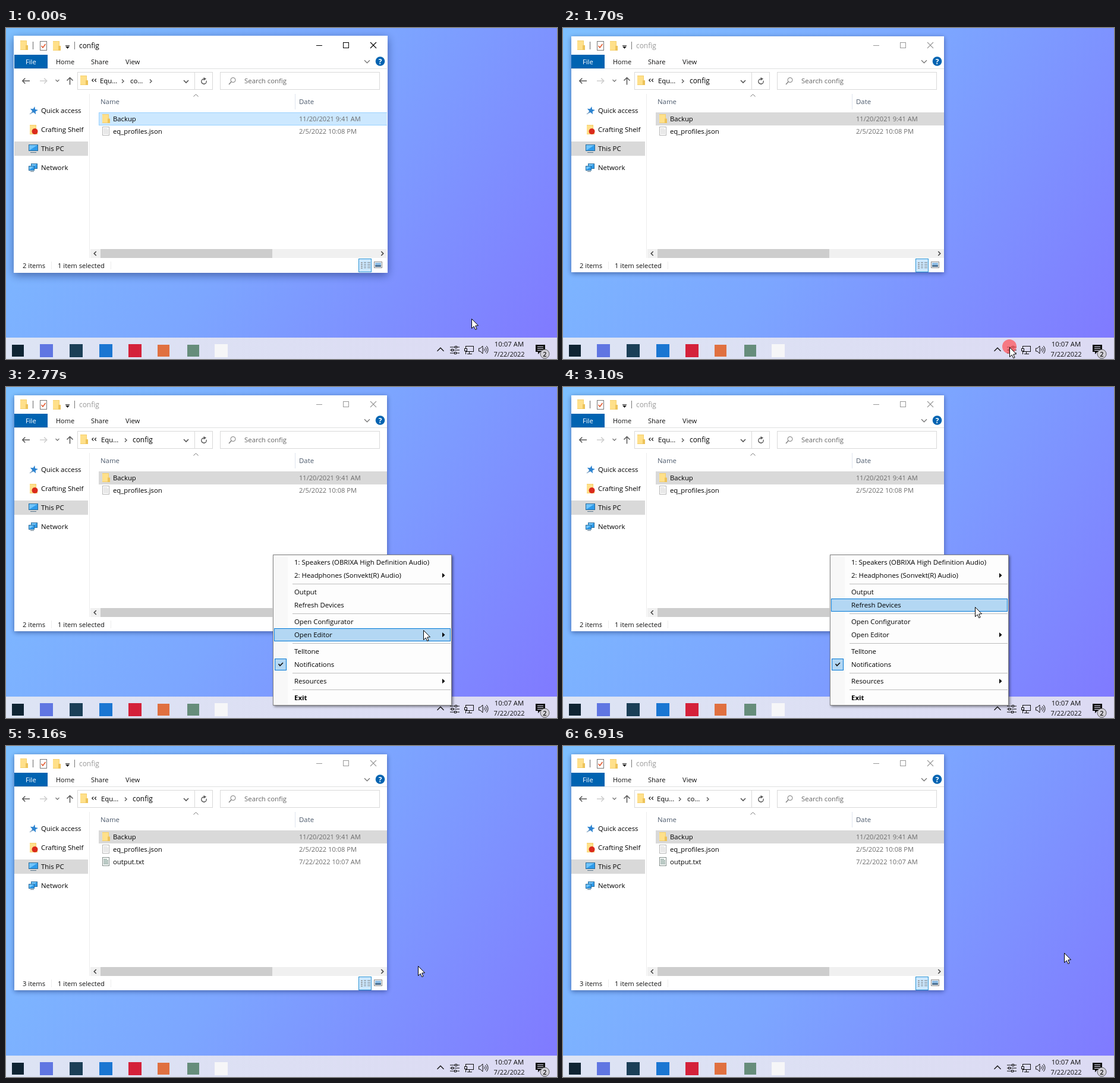
Write an HTML page with a canvas that moves like this. It is 927 px wide and 557 px high and loops after 8 s.

```html
<!DOCTYPE html>
<html lang="en">
<head>
<meta charset="utf-8">
<title>Tray menu demo</title>
<style>
  html, body { margin: 0; width: 100%; height: 100%; overflow: hidden; }
  canvas { display: block; width: 927px; height: 557px; }
</style>
</head>
<body>
<canvas id="stage" width="927" height="557"></canvas>
<script>
const ctx = document.getElementById('stage').getContext('2d');
const LOOP = 8000;
const BLUE = '#0063b1';
const PRESS = 1560, DEACTIVATE = 1630, MENU_OPEN = 1770;
const PICK = 4030, MENU_CLOSE = 4160, FILE_ADDED = 5160, PATH_SHRINK = 5490;

// time, x, y, easing power (above 1 eases in, below 1 eases out)
const POINTER = [
  [0, 783, 489, 1],
  [820, 759, 516, 1.4],
  [1230, 751, 537, 0.7],
  [2040, 751, 537, 1],
  [2230, 743, 504, 1.3],
  [2770, 702, 409, 1],
  [2900, 697, 382, 1],
  [3100, 693, 370, 0.6],
  [5420, 693, 370, 1],
  [5950, 722, 364, 1.9],
  [6290, 766, 358, 1],
  [6910, 843, 348, 0.8]
];

const MENU = [
  { label: '1: Speakers (OBRIXA High Definition Audio)', y: 295 },
  { label: '2: Headphones (Sonvekt(R) Audio)', y: 317, sub: true },
  { label: 'Output', y: 345 },
  { label: 'Refresh Devices', y: 367 },
  { label: 'Open Configurator', y: 395 },
  { label: 'Open Editor', y: 417, sub: true },
  { label: 'Telltone', y: 445 },
  { label: 'Notifications', y: 467, checked: true },
  { label: 'Resources', y: 495, sub: true },
  { label: 'Exit', y: 523, bold: true }
];

function pointerAt(t) {
  for (let i = 1; i < POINTER.length; i++) {
    const [t0, x0, y0] = POINTER[i - 1], [t1, x1, y1, power] = POINTER[i];
    if (t < t1) {
      const k = Math.pow((t - t0) / (t1 - t0), power);
      return [Math.round(x0 + (x1 - x0) * k), Math.round(y0 + (y1 - y0) * k)];
    }
  }
  return POINTER[POINTER.length - 1].slice(1, 3);
}

function box(x, y, w, h, fill, stroke) {
  if (fill) {
    ctx.fillStyle = fill;
    ctx.fillRect(x, y, w, h);
  }
  if (stroke) {
    ctx.strokeStyle = stroke;
    ctx.lineWidth = 1;
    ctx.strokeRect(x + 0.5, y + 0.5, w - 1, h - 1);
  }
}

function shadowBox(x, y, w, h, fill, shadow, blur, dx, dy) {
  ctx.save();
  ctx.shadowColor = shadow;
  ctx.shadowBlur = blur;
  ctx.shadowOffsetX = dx;
  ctx.shadowOffsetY = dy;
  box(x, y, w, h, fill);
  ctx.restore();
}

function trace(points) {
  ctx.beginPath();
  for (let i = 0; i < points.length; i += 2) ctx.lineTo(points[i], points[i + 1]);
}

function line(points, color, width = 1) {
  trace(points);
  ctx.strokeStyle = color;
  ctx.lineWidth = width;
  ctx.stroke();
}

function poly(points, color) {
  trace(points);
  ctx.fillStyle = color;
  ctx.fill();
}

function disc(x, y, r, fill, stroke) {
  ctx.beginPath();
  ctx.arc(x, y, r, 0, Math.PI * 2);
  ctx.fillStyle = fill;
  ctx.fill();
  if (stroke) {
    ctx.strokeStyle = stroke;
    ctx.lineWidth = 1;
    ctx.stroke();
  }
}

function arc(x, y, r, from, to, color, width = 1) {
  ctx.beginPath();
  ctx.arc(x, y, r, from, to);
  ctx.strokeStyle = color;
  ctx.lineWidth = width;
  ctx.stroke();
}

function text(str, x, y, color = '#000', size = 11.4, weight = 400, align = 'left') {
  ctx.font = `${weight} ${size}px "Open Sans", "Noto Sans", sans-serif`;
  ctx.textAlign = align;
  ctx.fillStyle = color;
  ctx.fillText(str, x, y);
}

// dx, dy give the direction the chevron points in
function chevron(x, y, dx, dy, size, color, width = 1.3) {
  const back = size / 2;
  line([
    x - dx * back - dy * size, y - dy * back - dx * size,
    x + dx * back, y + dy * back,
    x - dx * back + dy * size, y - dy * back + dx * size
  ], color, width);
}

function folder(x, y, w = 13, h = 16) {
  box(x, y, w - 2, h, '#f5cf6b');
  box(x, y + 1, w - 3, h - 2, '#ffe08a');
  box(x + w - 4, y + h / 2, 4, h / 2, '#edc35a');
}

function sheet(x, y, lines) {
  box(x, y, 12, 15, '#fff', lines ? '#7f8c88' : '#b5b5b5');
  for (let i = 0; i < 5; i++) {
    box(x + 2, y + 3 + i * 2, i === 0 ? 6 : 8, 1, lines ? '#75948a' : '#d2d2d2');
  }
}

function screenIcon(x, y, w, h) {
  box(x, y, w, h, '#2f9bea', '#276a9b');
  poly([x + 1, y + 1, x + w - 1, y + 1, x + 1, y + h - 1], '#70c4fa');
}

function drawDesktop() {
  const sky = ctx.createLinearGradient(0, 0, 870, 600);
  sky.addColorStop(0, '#7dc0ff');
  sky.addColorStop(0.5, '#7ca6ff');
  sky.addColorStop(1, '#807aff');
  box(0, 0, 927, 557, sky);
}

function drawTaskbar() {
  const bar = ctx.createLinearGradient(0, 0, 927, 0);
  bar.addColorStop(0, '#dde4f4');
  bar.addColorStop(1, '#dcdaf3');
  box(0, 521, 927, 36, bar);

  const apps = [
    [10, 20, '#0f2433'], [57, 22, '#6076e2'], [107, 22, '#1b3f57'], [157, 22, '#1a76d2'],
    [206, 22, '#d4213a'], [255, 20, '#e07040'], [305, 20, '#668d7b'], [351, 22, '#f6f6f8']
  ];
  for (const [x, size, color] of apps) box(x, 543 - size / 2, size, size, color);

  const ink = '#111';
  chevron(731, 541, 0, -1, 5.5, ink);

  for (const [y, knob] of [[537, 757], [542, 751], [547, 756]]) {
    box(747, y - 0.5, 16, 1, ink);
    box(knob - 2, y - 2, 4, 4, '#dddcf3', ink);
  }

  box(773, 535, 14, 10, null, ink);
  box(779, 545, 1, 3, ink);
  box(776, 548, 8, 1, ink);
  box(771, 539, 5, 5, '#dddcf3', ink);
  box(773, 544, 1, 5, ink);

  line([795.5, 539, 798, 539, 802, 535, 802, 548, 798, 544, 795.5, 544, 795.5, 539], ink);
  for (const r of [3, 6, 9]) arc(802, 541.5, r, -0.8, 0.8, ink);

  text('10:07 AM', 846.5, 536, ink, 11.4, 400, 'center');
  text('7/22/2022', 846.5, 553, ink, 11, 400, 'center');

  poly([891, 533, 907, 533, 907, 545, 899, 545, 895, 549, 895, 545, 891, 545], ink);
  for (let i = 0; i < 3; i++) box(894, 536 + i * 3, 10, 1, '#dddcf3');
  disc(906.5, 548.5, 7.5, '#d3d1d8', '#555');
  text('2', 906.5, 552.5, ink, 11, 600, 'center');
}

function drawFrame(active) {
  if (active) shadowBox(13, 13, 629, 399, '#fff', 'rgba(20,40,100,.55)', 14, 0, 4);
  else shadowBox(14, 14, 627, 397, '#fff', 'rgba(20,40,100,.55)', 8, 0, 2);
}

function drawTitle(active) {
  const ink = active ? '#000' : '#999';
  folder(24, 21);
  box(45, 23, 1, 13, '#666');
  box(57, 22, 12, 16, '#fff', '#777');
  line([59.5, 30, 62, 33, 66.5, 27], '#e2592f', 1.6);
  folder(79, 22);
  box(100, 29, 7, 1, '#222');
  poly([100, 31, 107, 31, 103.5, 35], '#222');
  box(115, 23, 1, 13, '#777');
  text('config', 123, 34, ink, 11.9);
  box(522, 29, 10, 1, ink);
  box(567, 24, 10, 10, null, ink);
  line([613, 24, 623, 34], ink, 1.1);
  line([623, 24, 613, 34], ink, 1.1);

  box(14, 45, 56, 23, BLUE);
  text('File', 33, 61, '#fff', 11.2);
  text('Home', 84, 61, '#111', 11);
  text('Share', 143, 61, '#111', 11);
  text('View', 201, 61, '#111', 11.2);
  box(14, 68, 627, 1, '#dfe0e1');
  chevron(607.5, 56.5, 0, 1, 4.5, '#777');
  disc(629.5, 56, 7.8, BLUE);
  text('?', 629.5, 60.5, '#fff', 12, 700, 'center');
}

function drawAddress(narrow) {
  line([40, 89, 28, 89], '#555', 1.5);
  chevron(30, 89, -1, 0, 4.5, '#555', 1.5);
  line([57, 89, 68, 89], '#ccc', 1.5);
  chevron(66.5, 89, 1, 0, 4.5, '#ccc', 1.5);
  chevron(86.5, 88.5, 0, 1, 3, '#777');
  line([107.5, 95.5, 107.5, 84], '#555', 1.5);
  chevron(107.5, 86, 0, -1, 5, '#555', 1.5);

  box(120, 74, 228, 30, '#fff', '#d9d9d9');
  box(317, 74, 1, 30, '#d9d9d9');
  folder(125, 80);
  chevron(146, 88, -1, 0, 2.5, '#222', 1.2);
  chevron(150.5, 88, -1, 0, 2.5, '#222', 1.2);
  if (narrow) {
    text('Equ...', 158, 93);
    chevron(196.5, 89.5, 1, 0, 3, '#555');
    text('co...', 209, 93);
    chevron(243.5, 89.5, 1, 0, 3, '#555');
  } else {
    text('Equ...', 160, 93);
    chevron(201.5, 89.5, 1, 0, 3, '#555');
    text('config', 213, 93, '#000', 11.9);
  }
  chevron(303, 90, 0, 1, 4, '#555', 1.6);
  arc(333, 90, 4.2, -0.3, 4.6, '#555', 1.4);
  poly([332.5, 83, 337, 85.5, 332.5, 88.5], '#555');

  box(360, 74, 269, 30, '#fff', '#d9d9d9');
  arc(382, 87.5, 4, 0, Math.PI * 2, '#777');
  line([379, 90.5, 375, 95], '#777', 1.2);
  text('Search config', 401, 93, '#666');
}

function drawSidebar() {
  box(140, 111, 1, 276, '#ececec');

  const star = [];
  for (let i = 0; i < 10; i++) {
    const a = i * Math.PI / 5 - 1.4, r = i % 2 ? 3 : 7;
    star.push(47 + r * Math.cos(a), 139 + r * Math.sin(a));
  }
  poly(star, '#2c83d0');
  line([40, 145, 45, 141], '#88a7c2', 1.2);
  text('Quick access', 59, 143);

  folder(40, 163, 13, 16);
  disc(48.5, 174, 5, '#da2a1c');
  text('Crafting Shelf', 59, 175);

  box(14, 191, 124, 24, '#d9d9d9');
  screenIcon(38, 196, 16, 11);
  box(41, 209, 10, 1, '#58748a');
  text('This PC', 59, 207);

  screenIcon(42, 228, 11, 9);
  screenIcon(38, 232, 10, 8);
  box(41, 241, 6, 1, '#58748a');
  text('Network', 59, 239);
}

function drawFiles(active, hasOutput) {
  text('Name', 159, 128, '#4c5a6c');
  text('Date', 493, 128, '#4c5a6c');
  box(486, 111, 1, 26, '#dfe5ee');
  chevron(319.5, 113.5, 0, -1, 4, '#777', 1);

  box(156, 142, 485, 22, active ? '#cce8ff' : '#d9d9d9');
  if (active) {
    box(156, 142, 485, 1, '#99d1ff');
    box(156, 163, 485, 1, '#99d1ff');
    box(156, 142, 1, 22, '#99d1ff');
  }
  const row = (name, date, y) => {
    text(name, 180, y + 4, '#000', 11.3);
    text(date, 493, y + 4, '#6d6d6d', 11.1);
  };
  folder(162, 145, 13, 15);
  row('Backup', '11/20/2021 9:41 AM', 153);
  sheet(162, 166, false);
  row('eq_profiles.json', '2/5/2022 10:08 PM', 174);
  if (hasOutput) {
    sheet(162, 187, true);
    row('output.txt', '7/22/2022 10:07 AM', 195);
  }

  box(142, 372, 499, 15, '#f0f0f0');
  box(159, 372, 289, 15, '#cdcdcd');
  chevron(150, 379.5, -1, 0, 3.5, '#444', 1.6);
  chevron(633, 379.5, 1, 0, 3.5, '#444', 1.6);

  text(hasOutput ? '3 items' : '2 items', 28, 404, '#111', 11.2);
  text('1 item selected', 87, 404, '#111', 11.2);
  box(76, 393, 1, 13, '#ededed');
  box(176, 393, 1, 13, '#ededed');

  box(593, 388, 22, 23, '#cce8ff', '#2a92d2');
  for (let i = 0; i < 4; i++) {
    const y = 394 + i * 3;
    box(597, y, 3, 2, '#a0a8ae');
    box(602, y, 4, 1, '#7d858b');
    box(608, y, 5, 1, '#7d858b');
  }
  box(619, 393, 14, 11, '#fff', '#888');
  box(621, 395, 10, 7, '#8ebde5');
  box(621, 399, 10, 3, '#4c6f8f');
}

function drawMenu(px, py) {
  shadowBox(449, 282, 301, 254, '#fdfdfd', 'rgba(0,0,0,.45)', 4, 2, 2);
  box(449, 282, 301, 254, '#fdfdfd', '#808080');
  box(451, 284, 23, 250, '#f8f8f8');
  for (const y of [331, 381, 431, 481, 509]) box(482, y, 266, 1, '#bdbdbd');

  for (const item of MENU) {
    const { label, y, sub, checked, bold } = item;
    const hover = px >= 451 && px < 748 && py >= y - 11 && py < y + 11;
    if (hover) box(451, y - 11, 297, 22, '#b3d7f3', '#0078d7');
    if (checked) {
      box(452, y - 10, 20, 20, '#b3d7f3', '#0078d7');
      line([458.5, y - 1, 461, y + 2, 466, y - 3], '#111', 1.7);
    }
    text(label, 485, y + 4, '#000', 11.4, bold ? 700 : 400);
    if (sub) poly([734, y - 4, 738.5, y, 734, y + 4], '#000');
  }
}

function drawPointer(x, y) {
  ctx.save();
  ctx.translate(x + 0.5, y + 0.5);
  trace([0, 0, 0, 16, 3.7, 12.6, 6.2, 18, 8.6, 17, 6.2, 11.6, 11, 11.2]);
  ctx.closePath();
  ctx.fillStyle = '#fff';
  ctx.fill();
  ctx.strokeStyle = '#000';
  ctx.lineWidth = 1;
  ctx.stroke();
  ctx.restore();
}

function draw(now) {
  const t = now % LOOP;
  const within = (from, to) => t >= from && t < to;
  const active = t < DEACTIVATE;
  const [px, py] = pointerAt(t);

  drawDesktop();
  drawTaskbar();
  drawFrame(active);
  drawTitle(active);
  drawAddress(active || t >= PATH_SHRINK);
  drawSidebar();
  drawFiles(active, t >= FILE_ADDED);
  if (within(MENU_OPEN, MENU_CLOSE)) drawMenu(px, py);
  if (within(PRESS, MENU_OPEN) || within(PICK, MENU_CLOSE)) {
    disc(px, py - 1, 12, 'rgba(255,82,88,.72)');
  }
  drawPointer(px, py);
  requestAnimationFrame(draw);
}
requestAnimationFrame(draw);
</script>
</body>
</html>
```
